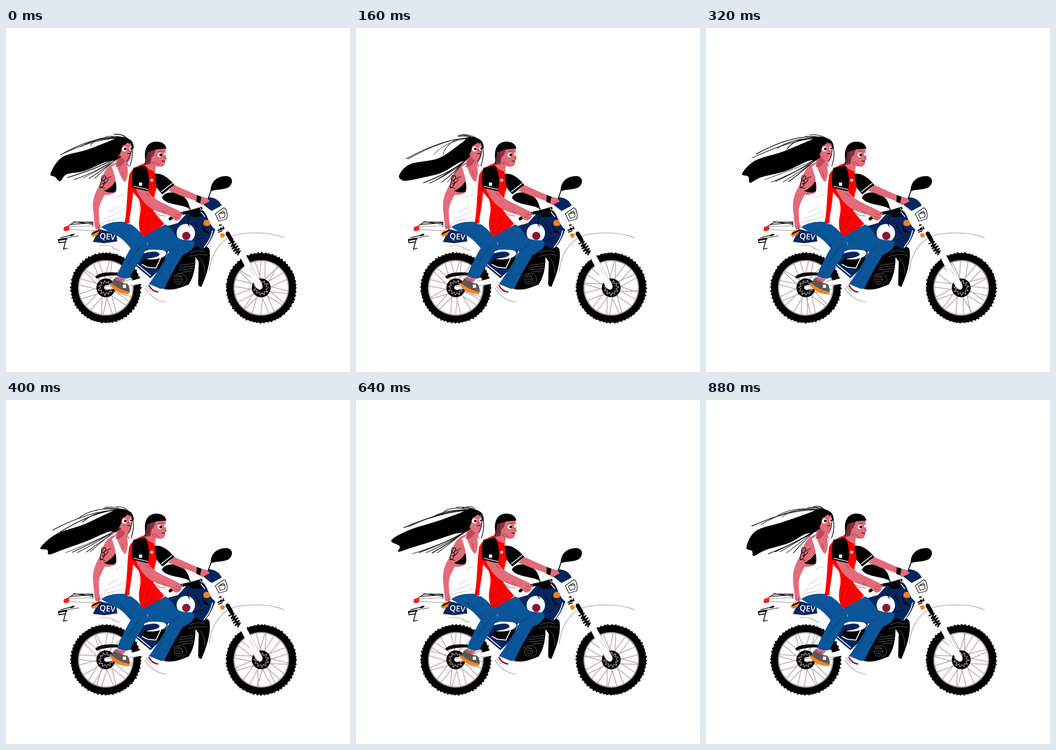
An HTML page for the animation above (0.96 s loop, 748x748 px).

```html
<!DOCTYPE html>
<html lang="en">
<head>
<meta charset="utf-8">
<title>Motorbike ride</title>
<style>
html, body { margin: 0; width: 100%; height: 100%; overflow: hidden; background: #fff; }
svg { display: block; width: 100vw; height: 100vh; }
.line { fill: none; stroke-linecap: round; stroke-linejoin: round; }
.grey { stroke: #b3a8aa; }
.ink { stroke: #000; }
.white { stroke: #fff; }
.shade { stroke: #a93850; }
.skin { fill: #e26c79; }
.jean { fill: #0b5599; }
.navy { fill: #07265f; }
.red { fill: #fe0000; }
.amber { fill: #f58220; }
</style>
</head>
<body>
<svg viewBox="0 0 748 748" stroke-width="2">
  <!-- rear rack and lamp -->
  <g class="line ink">
    <path d="M135 431L148 422L189 422L189 432M139 427L188 424M147 421L189 427" stroke-width="1.4"/>
    <path class="grey" d="M138 432L190 430M140 438L191 441" stroke-width="1.4"/>
    <path d="M119 456L147 449M114 460L132 457L129 465L115 467ZM130 462L125 481L133 479" stroke-width="1.8"/>
    <path d="M115 461L132 458M141 451L147 449" stroke-width="3.6"/>
    <path d="M134 456L158 452" stroke-width="1"/>
  </g>
  <path d="M126 433L137 429L138 439L130 442L125 440Z" fill="#f0241c"/>

  <!-- wheels -->
  <g id="rear" transform="translate(217 565)"></g>
  <g id="front" transform="translate(555 565)"></g>

  <!-- swingarm and guard -->
  <path d="M215 560L272 550L305 540L306 553L270 562L218 570Q210 566 215 560" fill="#fff"/>
  <path class="line grey" d="M236 561L215 562Q211 567 219 569L285 557M232 478L247 484M204 474Q222 470 234 478" stroke-width="1.4"/>
  <path d="M194 541C205 527 250 529 286 541L282 546C255 535 218 536 197 545Z"/>

  <!-- engine -->
  <path d="M394 482C405 470 434 470 442 480C447 502 437 536 425 563Q416 562 418 552L419 508L412 498C412 530 404 548 397 558C382 563 364 573 342 567L345 540L370 508Z"/>
  <g class="line" stroke="#706b70" stroke-width="1">
    <ellipse cx="375" cy="547" rx="9" ry="10"/>
    <path d="M364 539Q380 527 391 540Q398 552 384 558M370 541L381 541M369 546L382 546M370 551L380 551"/>
    <path d="M378 516L408 512M376 521L409 517M375 526L408 523M382 531L405 528M399 490Q416 480 432 487M397 497Q418 490 438 494M421 500Q432 510 433 535"/>
  </g>

  <!-- side panel -->
  <path class="navy" d="M281 516L298 478L354 481L340 520L314 544Z"/>
  <path d="M293 511L304 499L347 500L333 525L305 520Z"/>
  <path class="line white" d="M296 514L307 520L326 522L336 501M285 514L314 538"/>
  <path d="M300 486C318 477 349 480 349 490C346 501 320 506 303 502C330 499 338 494 332 489C326 484 310 487 300 490Z" fill="#fff"/>

  <!-- tank and cowl -->
  <path class="navy" d="M346 432L374 424L393 403L425 395C440 402 437 424 455 438C447 462 435 480 426 482Q411 466 397 482L365 459Z"/>
  <path d="M396 405L425 396L432 409L407 411ZM425 423L429 434L444 447L430 444Z"/>
  <circle cx="391" cy="446" r="20" fill="#fff"/>
  <circle cx="392" cy="452" r="9" fill="#8c1537"/>
  <path class="line white" d="M449 441Q446 459 431 477M424 400L432 410"/>
  <path class="line ink" d="M400 409Q391 422 399 432M411 424L424 447M413 462L431 455" stroke-width="1.3"/>
  <path class="line grey" d="M442 529C447 485 470 457 503 449C542 443 578 445 605 456" stroke-width="1.6"/>

  <!-- fork -->
  <path d="M510 500L521 492L557 557Q560 568 552 569Q545 568 541 559Z" fill="#fff"/>
  <path class="line grey" d="M530 522L540 538M523 497L556 557" stroke-width="1"/>
  <path class="line ink" d="M482 447L490 461" stroke-width="9"/>
  <path class="line ink" d="M485 469L496 464L490 475L500 469L492 480L504 474L495 485L507 480L499 490L509 485L504 493" stroke-width="3"/>
  <g class="line ink" stroke-width="1.3">
    <path d="M455 404L473 391Q480 392 481 408L480 415L463 420Z" fill="#fff"/>
    <path d="M462 405L472 398Q477 400 476 411L466 414ZM465 403L474 402"/>
    <path d="M464 429L468 428M466 436L469 435M472 432L474 436M461 440L474 436" stroke-width="2.4"/>
  </g>
  <path class="navy" d="M424 380L441 368Q461 369 469 386L447 398Z"/>
  <path class="amber" d="M430 420Q436 414 443 420L444 428Q435 434 429 427ZM465 449Q470 443 476 449Q476 457 468 456Z"/>
  <path class="line ink" d="M462 444L470 441"/>

  <!-- mirrors and bar -->
  <path d="M445 352C446 333 460 321 481 322C496 325 493 341 483 347C470 353 456 350 446 355ZM339 369C344 357 361 354 380 362C393 370 398 380 400 394C387 383 348 386 339 369Z"/>
  <path class="line ink" d="M447 350L440 370M396 385L401 396"/>
  <path class="line ink" d="M357 415C374 400 395 404 424 392" stroke-width="6.500"/>
  <path class="line white" d="M383 401L383 408M421 389L425 397" stroke-width="1.2"/>

  <!-- passenger -->
  <path class="navy" d="M189 465L202 437L240 447L242 464L214 468Z"/>
  <path class="amber" d="M184 449L191 440L205 439L198 451L188 454Z"/>
  <text x="203" y="458" transform="rotate(5 203 458)" fill="#fff" font-family="'Open Sans', sans-serif" font-size="17.500" font-weight="600">QEV</text>
  <path class="line ink" d="M188 447L202 440" stroke-width="3"/>
  <path class="skin" d="M238 293C216 298 211 320 203 342C191 362 187 378 190 400L193 431Q198 443 206 434L202 407C200 388 207 377 215 362L241 360L268 335L268 301L262 285L244 278Z"/>
  <path d="M213 354Q229 348 237 334L242 341L238 356Q226 360 213 354" />
  <path d="M230 302L239 296C247 318 253 332 259 335C266 325 266 310 263 298L269 304C269 340 266 386 261 424L207 431C199 421 202 398 213 369C224 360 239 364 240 351C240 331 235 314 230 302" fill="#fff"/>
  <path class="line" d="M222 402L243 390M212 416L252 399M222 420L258 410M239 369Q248 361 257 363M207 425Q225 416 237 417" stroke="#cfc8c9" stroke-width="1.1"/>
  <path class="line shade" d="M195 432L196 438M200 430L201 437M253 312L256 324M216 362L227 362" stroke-width="1.2"/>
  <path class="line ink" d="M210 320Q204 331 211 333Q222 323 213 321Q202 342 206 348Q217 342 213 330L228 323M209 339Q219 338 222 329M204 345L215 349" stroke-width="1.3"/>
  <path class="skin" d="M238 541L261 546L252 556L234 550Z"/>
  <path class="line shade" d="M240 544L251 552M244 542L237 551M252 545L244 553" stroke-width="1.2"/>
  <path d="M227 556L236 544Q246 554 264 556Q270 565 269 575L256 575Z" fill="#5a5859"/>
  <path class="amber" d="M225 556L229 555Q246 570 269 574L267 579C249 578 232 572 225 556"/>
  <rect x="254" y="558" width="7" height="7" fill="#fff"/>
  <path class="jean" d="M207 433C226 420 250 420 266 423C288 437 301 452 308 470C302 492 280 520 269 543Q257 548 241 539C250 517 263 492 271 479C259 464 247 452 230 447Z"/>
  <path class="line" d="M292 476Q273 499 263 517M237 440Q260 450 274 474" stroke="#084276" stroke-width="1.2"/>
  <g id="hair"></g>
  <path class="skin" d="M244 262C249 250 262 246 272 251C276 260 274 280 268 288Q262 296 253 296L244 283Z"/>
  <path d="M244 266Q247 286 238 302L249 301Q258 292 259 288L249 281Z" fill="#bc4b5d"/>
  <path d="M243 278L245 254Q258 243 274 255L267 249Q256 253 252 260Q250 272 246 276Z"/>
  <circle cx="257.500" cy="263" r="5.500" fill="#fff"/><circle cx="259.500" cy="263" r="2.800"/>
  <ellipse cx="271" cy="262" rx="3" ry="4.500" fill="#fff"/><circle cx="272" cy="262" r="2"/>
  <path class="line" d="M264 264L268 268M253 256L260 254" stroke="#d5203c" stroke-width="1.3"/>
  <path class="line ink" d="M264 273L270 273" stroke-width="1.3"/>
  <g id="strands" class="line ink"></g>

  <!-- rider -->
  <path d="M276 355L302 380L296 430L264 426Z" fill="#fff"/>
  <path class="red" d="M268 319Q275 303 301 294L324 308L328 346Q318 375 321 399L344 426L322 444L301 454C289 449 287 426 291 408Q295 390 289 372L276 357C275 385 269 402 268 425L258 423C264 394 263 349 268 319"/>
  <path class="line" d="M301 403L292 440M313 408L304 432M320 432L300 447" stroke="#bd0014" stroke-width="1.1"/>
  <path class="jean" d="M297 455L346 427C356 430 363 445 373 456C387 464 400 459 409 464C413 478 398 488 385 493C371 515 355 543 345 566Q329 570 310 558C327 534 344 508 355 486Q335 481 303 482L309 469Z"/>
  <path class="line" d="M357 484L376 472M352 490Q343 520 326 548" stroke="#084276" stroke-width="1.2"/>
  <path d="M303 566L312 557L336 567L347 595Q320 590 303 566" fill="#fff"/>
  <path class="line grey" d="M302 566C313 582 326 593 347 596M305 561L316 574" stroke-width="1.6"/>
  <path class="line" d="M311 560Q317 572 330 574" stroke="#8c1537" stroke-width="3"/>
  <path class="skin" d="M353 354L365 341L419 365L438 370L443 377L427 385L410 375Z"/>
  <path d="M415 363L425 367L422 381L414 378Z"/>
  <path d="M323 317C343 315 356 330 366 341L340 362L328 348Z"/>
  <path class="line white" d="M338 356L361 338" stroke-width="1.6"/>
  <path class="skin" d="M282 348L308 352C315 368 333 377 350 385L377 398Q385 405 380 414Q371 423 364 415L357 408L332 400C307 392 290 370 282 348"/>
  <path class="line shade" d="M305 359L312 366M318 397L333 407L347 409M340 398L348 403M369 404L378 407M366 410L376 413M374 362L390 369" stroke-width="1.2"/>
  <path d="M277 304L302 299C313 314 312 342 308 355L275 347Q272 320 277 304"/>
  <path class="line white" d="M278 344L308 351" stroke-width="1.6"/>
  <rect x="289" y="336" width="7" height="7" fill="#fff"/>
  <circle cx="317" cy="331" r="3" fill="#fff"/>
  <path class="line" d="M302 297Q311 308 322 310L324 317" stroke="#fff" stroke-width="1"/>
  <path class="skin" d="M311 264L328 259L347 262L348 280L349.500 285L346 289Q347 301 336 302L326 300L324 310Q310 306 300 297L309 286Z"/>
  <path d="M303 287C299 261 309 248 326 247Q345 247 349 262L326 264L317 277L315 288L307 297L301 297Z"/>
  <path d="M307 270L326 264L321 277L316 282L314 296L303 297Z" fill="#83313f"/>
  <path class="line" d="M309 267L307 292M312 267L311 291" stroke="#28121a" stroke-width="1"/>
  <circle cx="334.500" cy="276" r="5" fill="#fff"/><circle cx="336.500" cy="276" r="3"/>
  <ellipse cx="345.500" cy="274" rx="1.800" ry="3" fill="#fff"/>
  <path class="line" d="M331 269L342 267" stroke="#7f1f35" stroke-width="1.2"/>
  <path class="line shade" d="M322 290L333 299M344 280L348 284M317 291L322 297" stroke-width="1.2"/>
  <path class="line ink" d="M339 289L345 290" stroke-width="1.3"/>
</svg>
<script>
const STEP = 80, COUNT = 12, LOOP = STEP * COUNT;
const TAU = Math.PI * 2;
const $ = id => document.getElementById(id);

function make(parent, tag, attrs) {
  const el = document.createElementNS('http://www.w3.org/2000/svg', tag);
  for (const k in attrs) el.setAttribute(k, attrs[k]);
  return parent.appendChild(el);
}

function seeded(seed) {
  return () => (seed = (seed * 16807) % 2147483647) / 2147483647;
}

const polar = (r, a) => [r * Math.cos(a), r * Math.sin(a)].map(v => v.toFixed(1)).join(' ');

function wheel(id, seed) {
  const rnd = seeded(seed);
  const g = make($(id), 'g', {});
  const draw = (d, cls, width) => make(g, 'path', { d, class: 'line ' + cls, 'stroke-width': width });
  let knobs = '', spokes = '', star = 'M';
  for (let i = 0; i < 60; i++) {
    const a = (i + rnd() * .3) / 60 * TAU;
    knobs += `M${polar(73, a)}L${polar(74.8 + rnd() * 1.5, a)}`;
  }
  for (let i = 0; i < 24; i++) {
    const a = i / 24 * TAU, lean = (i % 2 ? .3 : -.3) + (rnd() - .5) * .25;
    spokes += `M${polar(16, a)}L${polar(58, a + lean)}`;
  }
  for (let i = 0; i < 22; i++) {
    star += `${i ? 'L' : ''}${polar(i % 2 ? 10.5 : 15.5 + rnd() * 2, i / 22 * TAU)}`;
  }
  draw(knobs, 'ink', 4);
  make(g, 'circle', { r: 67.5, class: 'line ink', 'stroke-width': 16 });
  draw(spokes, 'grey', 1.8);
  make(g, 'circle', { r: 59, class: 'line grey', 'stroke-width': 2.6 });
  make(g, 'circle', { r: 20.5 });
  draw(star + 'Z', 'grey', 1.4);
  g.animate([{ transform: 'rotate(0deg)' }, { transform: 'rotate(360deg)' }],
    { duration: LOOP, iterations: Infinity, easing: `steps(${COUNT})` });
}

// Hair outline: upper edge, tip, lower edge; keyed by step.
const poses = [
  [0, '225 246 175 265 122 281 97 316 107 324 118 333 132 318 170 311 215 292'],
  [2, '228 251 180 283 118 296 94 320 103 332 128 329 142 326 185 315 222 294'],
  [3, '222 246 165 267 105 285 82 312 94 320 98 337 115 324 172 315 220 292'],
  [5, '222 246 168 271 110 291 75 321 90 326 94 336 125 325 175 307 222 287'],
  [7, '215 243 170 272 125 299 92 338 106 346 125 348 145 330 175 318 215 290'],
  [8, '225 246 175 264 115 283 77 305 95 318 92 330 118 322 160 309 215 291'],
  [11, '220 247 165 266 108 285 88 320 100 328 104 339 130 326 180 311 215 292']
].map(([at, s]) => ({ at, v: s.split(' ').map(Number) }));

function poseAt(step) {
  const n = poses.findIndex(p => p.at >= step);
  const b = poses[n], a = poses[Math.max(0, n - 1)];
  const k = b.at === a.at ? 0 : (step - a.at) / (b.at - a.at);
  const pts = [];
  for (let i = 0; i < b.v.length; i += 2) {
    pts.push([0, 1].map(j => a.v[i + j] + (b.v[i + j] - a.v[i + j]) * k));
  }
  return pts;
}

// Closed Catmull-Rom curve.
function blob(p) {
  const n = p.length, at = i => p[(i + n) % n];
  let d = `M${p[0]}`;
  for (let i = 0; i < n; i++) {
    const [a, b, c, e] = [at(i - 1), at(i), at(i + 1), at(i + 2)];
    const c1 = b.map((v, j) => v + (c[j] - a[j]) / 6);
    const c2 = c.map((v, j) => v - (e[j] - b[j]) / 6);
    d += `C${c1} ${c2} ${c}`;
  }
  return d + 'Z';
}

function strands(p, rnd) {
  const out = [];
  for (let i = 0; i < 4; i++) {
    const k = rnd(), end = p[i % 2 ? 2 : 1], lift = 4 + rnd() * 14;
    out.push(`M${255 - k * 12} ${240 - k * 2}Q${p[0][0] - 30} ${p[0][1] - lift} ${end[0] + k * 25 - 12} ${end[1] - lift * .8}`);
  }
  for (let i = 0; i < 5; i++) {
    const k = rnd(), drop = 4 + rnd() * 9, end = p[6];
    out.push(`M${244 + k * 6} ${274 + k * 6}Q${p[8][0] + 5} ${p[8][1] + drop} ${end[0] + i * 14 + k * 8} ${end[1] + drop}`);
  }
  for (let i = 0; i < 3; i++) {
    const x = 210 + rnd() * 30, y = 231 + rnd() * 7;
    out.push(`M${x} ${y}Q${x + 18} ${y - 3} ${258 + i * 4} ${240 + i}`);
  }
  const sway = rnd() * 5;
  out.push(`M271 247Q${280 + sway} 268 ${269 + sway} 300`, `M274 255Q${272 + sway} 276 ${262 + sway} 291`);
  return out;
}

function showAt(el, step) {
  el.animate([
    { opacity: 1, easing: 'step-end' },
    { opacity: 0, offset: 1 / COUNT, easing: 'step-end' },
    { opacity: 0 }
  ], { duration: LOOP, iterations: Infinity, delay: step * STEP - LOOP });
}

for (let s = 0; s < COUNT; s++) {
  const p = poseAt(s), rnd = seeded(71 + s * 977);
  const head = [[238, 287], [248, 276], [262, 260], [277, 262], [274, 247], [262, 239], [246, 237]];
  showAt(make($('hair'), 'path', { d: blob([...p, ...head]) }), s);
  const g = make($('strands'), 'g', {});
  for (const d of strands(p, rnd)) make(g, 'path', { d, 'stroke-width': (.9 + rnd() * .7).toFixed(2) });
  showAt(g, s);
}

wheel('rear', 311);
wheel('front', 829);
</script>
</body>
</html>
```
